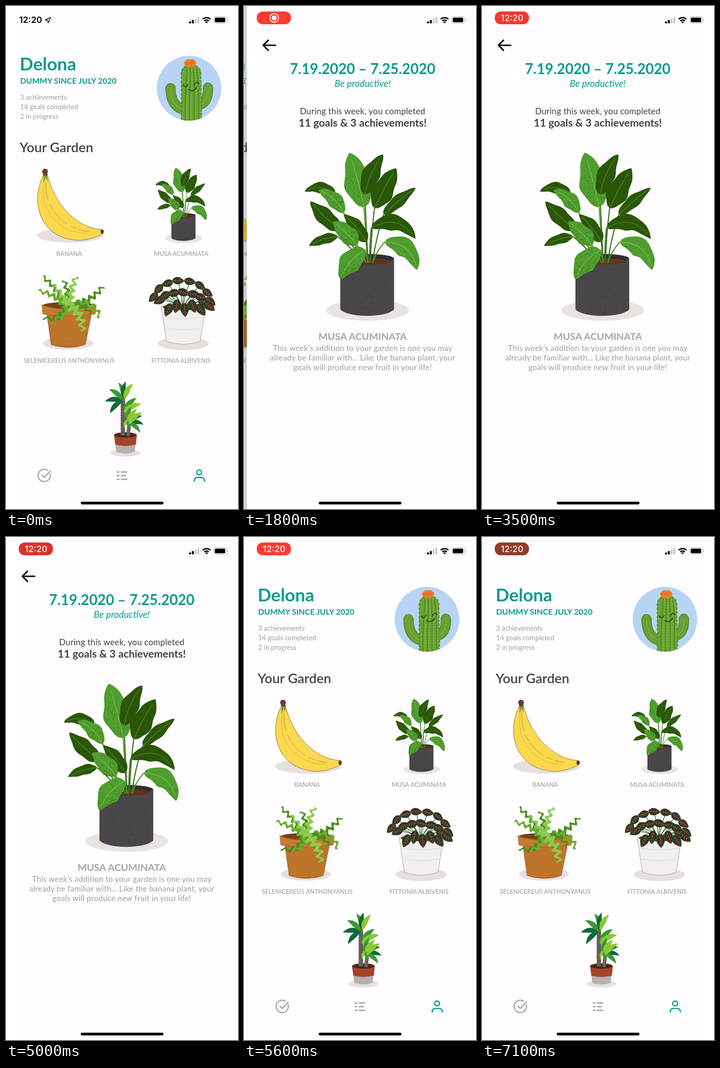
Write an HTML page that moves like this. It is 509 px wide and 1101 px high and loops after 7.2 s.

```html
<!DOCTYPE html>
<html lang="en">
<head>
<meta charset="utf-8">
<title>Garden</title>
<style>
html, body { margin: 0; width: 100%; height: 100%; overflow: hidden; background: #fffdff; }
svg { display: block; width: 100vw; height: 100vh; }
text { font-family: Lato, "Open Sans", sans-serif; }
.mid { text-anchor: middle; }
.bold { font-weight: 700; }
.medium { font-weight: 500; }
.teal { fill: #079c8b; }
.dark { fill: #454244; }
.grey { fill: #a9a5a7; }
.label { font-weight: 500; text-anchor: middle; fill: #a39fa1; }
.clock { font: 600 19px Inter, sans-serif; }
.line { fill: none; stroke-linecap: round; stroke-linejoin: round; }
.butt { stroke-linecap: butt; }
</style>
</head>
<body>
<svg id="stage" viewBox="0 0 509 1101"></svg>
<script>
const W = 509, H = 1101, LOOP = 7200, TAU = 2 * Math.PI;
const TEAL = '#079c8b', GREY = '#a9a5a7', SHADOW = '#e5dfde';
let seed = 7, clips = 0;
const rnd = () => (seed = (seed * 16807) % 2147483647) / 2147483647;
const r1 = v => Math.round(v * 10) / 10;
const times = (n, f) => Array.from({ length: n }, (_, i) => f(i)).join('');

const fill = (d, color) => `<path d="${d}" fill="${color}"/>`;
const line = (d, color, w = 1, more = '') =>
  `<path class="line" d="${d}" stroke="${color}" stroke-width="${w}" ${more}/>`;
const oval = (x, y, rx, ry, color) =>
  `<ellipse cx="${x}" cy="${y}" rx="${rx}" ry="${ry}" fill="${color}"/>`;
const text = (x, y, size, cls, str, more = '') =>
  `<text x="${x}" y="${y}" font-size="${size}" class="${cls}" ${more}>${str}</text>`;

// Filled shape with seeded specks that thicken toward its lower edge
function grainy(d, color, speck, count, size = 1) {
  const v = d.match(/[\d.]+/g).map(Number), id = 'clip' + clips++;
  const [xs, ys] = [0, 1].map(k => v.filter((_, i) => i % 2 === k));
  const [x0, y0] = [Math.min(...xs), Math.min(...ys)];
  const w = Math.max(...xs) - x0, h = Math.max(...ys) - y0;
  const dots = times(count, () => `M${r1(x0 + w * rnd())} ${r1(y0 + h * Math.sqrt(rnd()))}h.1`);
  return `<clipPath id="${id}"><path d="${d}"/></clipPath>` + fill(d, color) +
    `<g clip-path="url(#${id})">${line(dots, speck, size)}</g>`;
}

// Control point of an arc whose middle lies "bend" to the side of its chord
function control(x0, y0, x1, y1, bend) {
  const dx = x1 - x0, dy = y1 - y0, k = 2 * bend / Math.hypot(dx, dy);
  return [(x0 + x1) / 2 - dy * k, (y0 + y1) / 2 + dx * k];
}
const arc = (x0, y0, x1, y1, bend) =>
  `M${x0} ${y0}Q${control(x0, y0, x1, y1, bend).map(r1).join(' ')} ${x1} ${y1}`;

// Outline along an arc: half(t) is its half width, sway(t) its sideways swing
function ribbon(x0, y0, x1, y1, bend, half, sway = () => 0, steps = 24) {
  const [cx, cy] = control(x0, y0, x1, y1, bend), sides = [[], []];
  for (let i = 0; i <= steps; i++) {
    const t = i / steps, u = 1 - t;
    const tx = u * (cx - x0) + t * (x1 - cx), ty = u * (cy - y0) + t * (y1 - cy), l = Math.hypot(tx, ty);
    const x = u * u * x0 + 2 * u * t * cx + t * t * x1, y = u * u * y0 + 2 * u * t * cy + t * t * y1;
    sides.forEach((side, k) => {
      const off = sway(t) + (k ? -1 : 1) * half(t);
      side.push(r1(x - ty / l * off) + ' ' + r1(y + tx / l * off));
    });
  }
  return 'M' + sides[0].concat(sides[1].reverse()).join('L') + 'Z';
}
const belly = (t, lean, round) => Math.pow(Math.max(0, Math.sin(Math.PI * Math.pow(t, lean))), round);

function musa() {
  let stems = '', leaves = '';
  const leaf = (light, x, y, tipX, tipY, bend, w) => {
    const phase = rnd() * TAU;
    const shape = ribbon(x, y, tipX, tipY, bend,
      t => w * belly(t, .8, .75) * (1 + .09 * Math.sin(phase + t * 13)));
    stems += line(arc(x, y, r1(265 + (x - 256) * .25), 561, (x - 256) * .06), light ? '#4f962e' : '#39701a', 2.4);
    leaves += grainy(shape, light ? '#509e30' : '#2a5707', light ? '#32700f' : '#407622', light ? 190 : 70, light ? 1.4 : 1) +
      line(arc(x, y, tipX, tipY, bend), light ? '#82bb4c' : '#578930', 1.3, 'pathLength="1" stroke-dasharray=".88"');
  };
  leaf(1, 257, 441, 225, 321, 2, 30);
  leaf(0, 280, 443, 328, 355, -2, 23);
  leaf(0, 259, 413, 299, 325, -6, 19);
  leaf(0, 300, 457, 370, 398, -2, 13);
  leaf(0, 194, 411, 127, 406, 11, 12);
  leaf(1, 212, 453, 157, 403, 8, 16);
  leaf(0, 205, 490, 139, 428, -2, 18);
  leaf(0, 200, 505, 136, 525, 4, 11);
  leaf(0, 262, 517, 213, 456, 3, 16);
  leaf(1, 242, 524, 189, 472, 3, 19);
  leaf(0, 273, 486, 370, 510, -24, 17);
  leaf(1, 302, 517, 373, 578, -20, 20);
  leaf(1, 260, 534, 205, 598, 8, 23);
  return oval(265, 666, 91, 23, '#e9e3e1') +
    grainy('M205 553L205 664C222 683 306 683 323 664L323 552C315 540 215 540 205 553Z', '#4a474a', '#353235', 420, 1.2) +
    oval(264, 553, 57, 10, '#302e30') + oval(267, 559, 48, 7, '#603617') + stems + leaves;
}

function banana() {
  const body = 'M83 368C50 430 76 513 163 513Q190 511 213 498L211 489C160 487 108 440 91 369Z';
  const ridge = k => `M${84 + k * 5} 386C${66 + k * 24} 440 ${104 + k * 24} ${500 - k * 18} ${172 + k * 14} ${500 - k * 8}`;
  return oval(141, 502, 73, 16, SHADOW) +
    grainy(body, '#fbd84d', '#d7a23a', 170, .9) + line(body, '#685526', .8) +
    line(ridge(.25), '#d9af38', 1) + line(ridge(.75), '#a5803a', .8, 'stroke-dasharray="40 9 14 5"') +
    fill('M82 370L82 388L87 376L91 385L91 370Z', '#8a9b37') +
    fill('M79 361L83 356L90 357L92 362L90 371L82 371Z', '#694032') + oval(211, 494, 3.5, 5, '#583929');
}

function fern() {
  const deep = '#4b9020', mid = '#69ad31', pale = '#8bcb4d';
  const frond = (tipX, tipY, bend, w, color) => {
    const x = 138 + (tipX - 138) * .12, y = 656, waves = Math.hypot(tipX - x, tipY - y) / 15;
    return fill(ribbon(x, y, tipX, tipY, bend, t => w * (1.05 - .7 * t),
      t => w * .6 * Math.sin(t * waves * TAU), 60), color);
  };
  return oval(136, 738, 55, 14, SHADOW) +
    grainy('M90 676L99 741C119 750 155 750 174 741L187 676Z', '#bd752b', '#9c5b1d', 160, .9) +
    line('M90 678L99 741Q136 752 174 741L187 678', '#805021', .8) +
    oval(138, 656, 59, 8, '#73421e') +
    grainy('M79 654C100 666 173 667 198 654L196 674C170 682 107 682 81 674Z', '#c77b2f', '#a66420', 70, .9) +
    line('M79 654Q138 670 198 654L196 674Q138 684 81 674Z', '#8b5724', .8) +
    frond(81, 593, 5, 6, deep) + frond(71, 624, 6, 6, mid) + frond(82, 682, -14, 6, deep) +
    frond(106, 684, -9, 5, mid) + frond(127, 600, 3, 6, deep) + frond(213, 614, 7, 7, deep) +
    frond(207, 682, -16, 7, mid) + frond(186, 677, -10, 6, deep) + frond(102, 612, 4, 6, pale) +
    frond(155, 591, -4, 7, pale) + frond(167, 712, -8, 9, pale);
}

function veined(x, y, turn, l) {
  const d = ribbon(-l, 0, l, 0, 0, t => l * .6 * belly(t, .8, .8));
  const ribs = `M${-l} 0H${l * .85}` + times(3, i => {
    const k = l * (i * .4 - .6);
    return `M${k + l * .28} ${-l * .34}L${k} 0L${k + l * .28} ${l * .34}`;
  });
  return `<g transform="translate(${r1(x)} ${r1(y)}) rotate(${r1(turn)})">` + fill(d, '#26301f') +
    line(d, '#3d6f41', .9) + line(ribs, '#c65c47', .9) + '</g>';
}

function fittonia() {
  let stems = '', leaves = '';
  const ring = (n, rx, ry, l) => {
    for (let i = 0; i < n; i++) {
      const a = Math.PI * (1.08 + .9 * i / (n - 1));
      const x = 385 + rx * Math.cos(a), y = 650 + ry * Math.sin(a);
      stems += line(arc(388, 664, r1(x), r1(y), (385 - x) * .12), '#477345', 1.5);
      leaves += veined(x, y, (x < 375 ? 165 : 8) + (x - 385) * .4 + (rnd() - .5) * 30, l);
    }
  };
  ring(8, 64, 49, 13);
  ring(7, 50, 23, 14);
  leaves += times(6, i => veined(356 + i * 18, 665 - i % 2 * 8, 115 - i * 15, 15));
  return oval(389, 739, 56, 14, SHADOW) +
    grainy('M340 656L352 734C370 743 410 743 426 734L438 656Z', '#f3efef', '#e3dbdd', 130) +
    line('M340 656L352 734Q389 747 426 734L438 656', '#918b8d', .8) +
    line('M344 680Q389 689 434 680M347 704Q389 713 431 704', '#e7e2e2', 2) +
    oval(389, 657, 49, 9, '#e8e3e3') + oval(389, 659, 45, 7, '#4a382d') + stems + leaves;
}

function yucca() {
  // Blades spread evenly between two angles, dark on the left to bright on the right
  const fan = (x, y, from, to, n, len, colors) => times(n, i => {
    const deg = from + (to - from) * i / (n - 1), a = deg * Math.PI / 180;
    const d = ribbon(x, y, x + len * Math.cos(a), y + len * Math.sin(a), deg < 270 ? 4 : -4,
      t => len * .14 * belly(t, .9, .9));
    return fill(d, colors[i % colors.length]);
  });
  const deep = '#126939', mid = '#3c9834', pale = '#8bc832';
  return oval(262, 978, 33, 8, SHADOW) +
    fill('M237 939L242 976Q262 983 282 976L287 939Z', '#b7b1ae') +
    fill('M237 939L240 960Q262 966 285 960L287 939Z', '#a54429') +
    oval(262, 939, 25, 6, '#672e20') + oval(262, 940, 21, 4, '#3b2a21') +
    line('M256.500 855V940', '#6c615d', 9.5, 'style="stroke-linecap:butt"') + line('M271 908L268 938', '#6c615d', 8) +
    line(times(13, i => `M252 ${860 + i * 6}l9 2`), '#4f4541', .8) +
    fan(256, 864, 135, 220, 3, 39, [deep, deep, mid]) +
    fan(260, 862, 250, 298, 3, 40, [mid, deep, pale]) +
    fan(258, 890, 312, 334, 2, 43, [mid, pale]) +
    fan(268, 912, 335, 400, 3, 34, [deep, deep, mid]) +
    fan(267, 918, 262, 318, 4, 42, [pale, mid, pale, pale]) +
    fan(268, 906, 70, 110, 2, 20, [mid, pale]);
}

function avatar() {
  const body = 'M385 258L385 147C385 123 427 123 427 147L429 258Z';
  const arms = 'M396 227C373 226 361 208 361 180M420 217C439 214 444 198 443 179';
  const ribs = times(4, i => `M${393 + i * 10} 258C${391 + i * 10} 215 ${395 + i * 10} 180 ${397 + i * 7} 136`);
  return '<clipPath id="face"><circle cx="401.500" cy="180" r="71"/></clipPath><g clip-path="url(#face)">' +
    oval(401.5, 180, 71, 71, '#b7d4f4') + line(arms, '#4e8628', 22.5) + line(arms, '#68a132', 19.5) +
    line(arms, '#89b944', 2, 'stroke-dasharray="2 4"') +
    grainy(body, '#6aa534', '#518c29', 120, 1.2) + line(body, '#5a9230', 3, 'stroke-dasharray="4 5"') +
    line(ribs, '#4f8a2a', 2.4) + line(ribs, '#91bd4b', 1.6, 'stroke-dasharray="2 4" transform="translate(4 0)"') +
    times(6, i => oval(404 + 7.5 * Math.cos(i * TAU / 6), 125 + 3.5 * Math.sin(i * TAU / 6), 6, 6, '#f17a24')) +
    line('M396 127q3-6 7-1q4-8 8 1', '#d6571c', 1.2) +
    line('M389 173Q395 181 399 172M413 173Q418 163 424 170M401 183Q412 189 418 178', '#203c19', 1.8) + '</g>';
}

const garden = text(30, 141, 39, 'bold teal', 'Delona') +
  text(31, 170, 17.5, 'bold teal', 'DUMMY SINCE JULY 2020') +
  ['3 achievements', '14 goals completed', '2 in progress']
    .map((s, i) => text(31, 205 + i * 21, 14.9, 'grey medium', s)).join('') +
  text(30, 320, 29.4, 'dark', 'Your Garden', 'font-weight="600"') + avatar() +
  banana() + fern() + fittonia() + yucca() +
  '<g id="card"><use href="#musa" transform="translate(271.100 210.300) scale(.448)"/>' +
  text(384, 547, 13.4, 'label', 'MUSA ACUMINATA') + '</g>' +
  text(138.5, 547, 13.4, 'label', 'BANANA') +
  text(138.5, 781, 13.4, 'label', 'SELENICEREUS ANTHONYANUS') +
  text(384, 781, 13.4, 'label', 'FITTONIA ALBIVENIS') +
  line('M97 1024A13.500 13.500 0 1 1 91 1016M79 1027l5 5L97 1018', GREY, 2.7) +
  line(times(3, i => `M244 ${1020 + i * 8}h4m5 0h${i === 1 ? 9 : 12}`), GREY, 2.8) +
  line('M413 1040v-2a6 6 0 0 1 6-6h10a6 6 0 0 1 6 6v2M418.500 1021a5.300 5.300 0 1 0 10.600 0a5.300 5.300 0 1 0-10.600 0', TEAL, 2.7);

const story = ['This week’s addition to your garden is one you may',
  'already be familiar with... Like the banana plant, your', 'goals will produce new fruit in your life!'];
const detail = '<rect x="-9" width="9" height="1101" fill="url(#edge)"/>' +
  `<rect width="${W}" height="${H}" fill="#fffdff"/>` +
  '<g id="back">' + line('M63 86H36M47 75L36 86L47 97', '#000', 3.2) + '</g>' +
  text(254, 149, 31.5, 'mid bold teal', '7.19.2020 – 7.25.2020') +
  text(254, 177, 20.6, 'mid teal', 'Be productive!', 'font-style="italic"') +
  text(254, 237, 18.7, 'mid dark', 'During this week, you completed', 'letter-spacing=".2"') +
  text(254, 264, 23.2, 'mid bold dark', '11 goals &amp; 3 achievements!') +
  '<use href="#musa"/>' + text(254, 731, 21.5, 'mid bold grey', 'MUSA ACUMINATA') +
  story.map((s, i) => text(254, 755 + i * 21.2, 17.2, 'mid medium grey', s, 'letter-spacing=".2"')).join('');

const status = '<g id="plain">' + text(29, 37, 19, 'clock', '12:20') +
  line('M86 30.500L98 25L92.500 37L91.500 31.500Z', '#000', 1.5) + '</g>' +
  '<g id="pill"><rect id="badge" x="28" y="12" width="75" height="28" rx="13"/>' +
  '<g id="rec"><circle cx="66" cy="26" r="9.500" fill="none" stroke="#fff" stroke-width="2"/>' + oval(66, 26, 5.5, 5.5, '#fff') + '</g>' +
  text(66, 33, 19, 'clock mid', '12:20', 'id="time" fill="#fff" style="font-weight:500"') + '</g>' +
  times(4, i => `<rect x="${401.5 + i * 6.1}" y="${34 - i * 3.3}" width="4.400" height="${4 + i * 3.3}" rx="1" fill="${i < 2 ? '#000' : '#cdcbcd'}"/>`) +
  line('M431.500 28.800A12.500 12.500 0 0 1 448.500 28.800M435 32.600A7.500 7.500 0 0 1 445 32.600', '#000', 2.9, 'style="stroke-linecap:butt"') +
  fill('M440 38L437 35A4.200 4.200 0 0 1 443 35Z', '#000') +
  '<rect x="456" y="23.500" width="28.500" height="14" rx="4" fill="none" stroke="#a5a3a5"/>' +
  '<rect x="458" y="25.500" width="23" height="10" rx="2.500"/>' + fill('M486 28q2.500 2.500 0 5Z', '#999') +
  '<rect x="164" y="1085" width="181.500" height="6" rx="3"/>';

const $ = id => document.getElementById(id);
$('stage').innerHTML = `<defs><linearGradient id="edge"><stop stop-opacity="0"/><stop offset="1" stop-opacity=".14"/></linearGradient>
  <g id="musa">${musa()}</g></defs>
  <g id="garden">${garden}</g><rect id="dim" width="${W}" height="${H}"/>
  <g id="detail">${detail}</g>${status}`;

const ramp = (t, from, length) => Math.max(0, Math.min(1, (t - from) / length));
const spring = (t, from) => {
  const k = Math.max(0, t - from) * .0183;
  return 1 - (1 + k) * Math.exp(-k);
};
const mix = (a, b, k) => `rgb(${a.map((v, i) => Math.round(v + (b[i] - v) * k))})`;
const show = (id, opacity) => $(id).setAttribute('opacity', opacity);
const shift = (id, x) => $(id).setAttribute('transform', `translate(${x.toFixed(2)} 0)`);

function draw(t) {
  const open = spring(t, 1450) - spring(t, 5060);
  shift('garden', -.3 * W * open);
  shift('detail', W * (1 - open));
  $('detail').style.display = open < .003 ? 'none' : '';
  show('dim', .1 * open);
  show('card', 1 - .8 * (ramp(t, 1250, 120) - ramp(t, 1450, 250)));
  show('back', 1 - .8 * ramp(t, 5000, 100));

  const on = ramp(t, 400, 200), timed = ramp(t, 2800, 200);
  show('plain', 1 - on);
  show('pill', on);
  show('rec', 1 - timed);
  show('time', timed);
  const pulse = Math.pow((1 - Math.cos((t - 1800) / 1900 * TAU)) / 2, .6);
  $('badge').setAttribute('fill', t < 7000 ? mix([255, 59, 48], [212, 48, 42], pulse)
    : mix([230, 52, 44], [146, 60, 38], ramp(t, 6950, 150)));
}

function tick(now) {
  draw(Math.floor(now / 100) * 100 % LOOP);
  requestAnimationFrame(tick);
}
draw(0);
requestAnimationFrame(tick);
</script>
</body>
</html>
```
